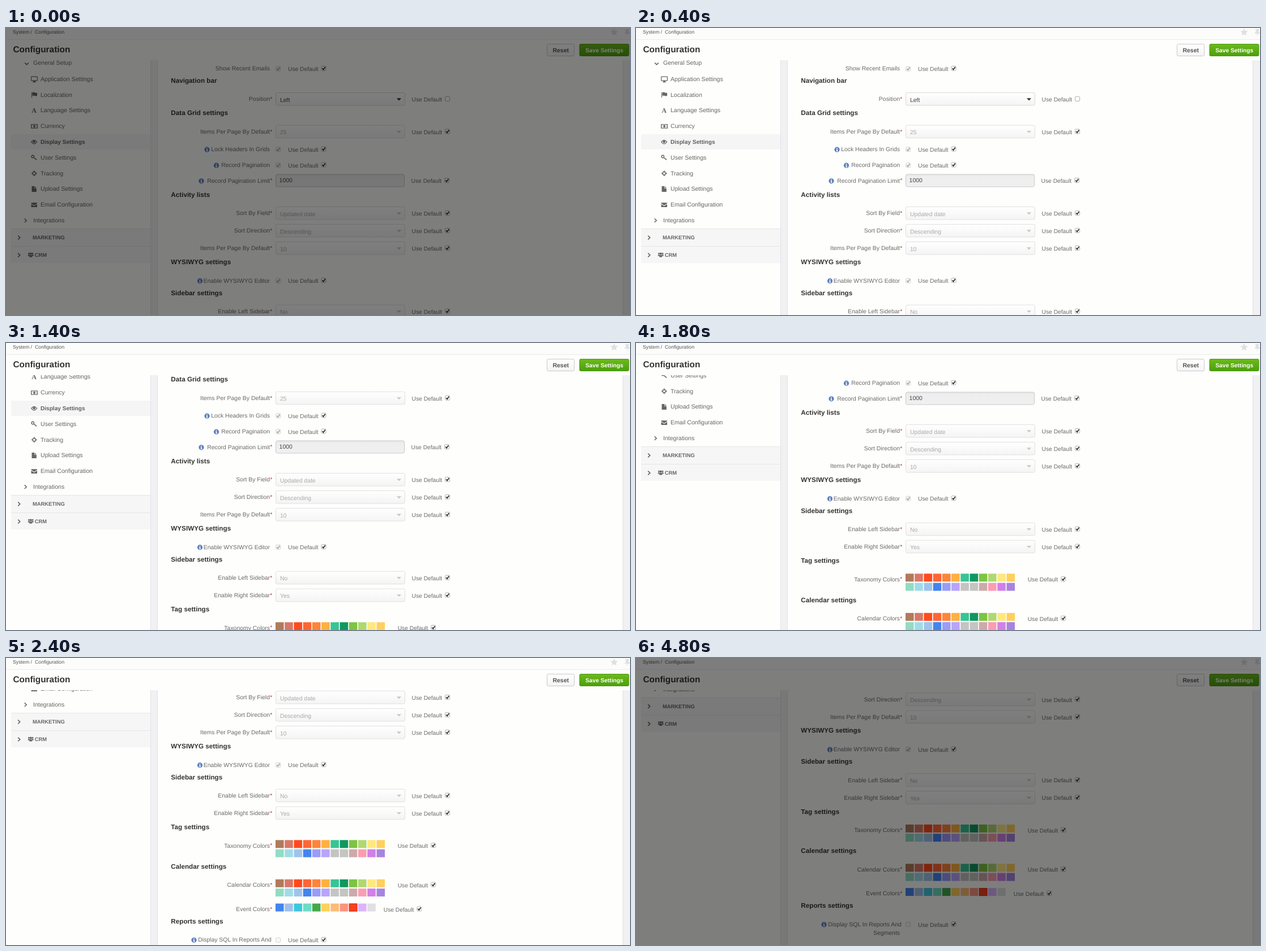
An HTML page that plays this animation: 1102x508 px, repeating every 5000 ms.

```html
<!DOCTYPE html>
<html lang="en">
<head>
<meta charset="utf-8">
<title>Configuration</title>
<style>
  html, body { margin: 0; width: 100%; height: 100%; overflow: hidden; background: #fefefc; }
  svg { display: block; width: 1102px; height: 508px; font-family: "Liberation Sans", Arial, sans-serif; }
  text { white-space: pre; text-rendering: geometricPrecision; }
  .crumb { font-size: 8.75px; fill: #555; }
  .title { font-size: 15.4px; font-weight: bold; fill: #333; }
  .btn { font-size: 10.5px; font-weight: bold; fill: #555; }
  .save { font-size: 10.2px; font-weight: bold; fill: #fff; }
  .nav { font-size: 10.57px; fill: #666; }
  .on { font-size: 10.1px; font-weight: bold; fill: #606060; }
  .group { font-size: 9.4px; font-weight: bold; fill: #666; }
  .head { font-size: 11.7px; font-weight: bold; fill: #333; }
  .label { font-size: 10.45px; fill: #6b6b6b; }
  .use { font-size: 10.25px; fill: #6b6b6b; }
  .star { font-size: 10.5px; fill: #b5464a; }
  .value { font-size: 10.45px; fill: #aaa; }
  .live { font-size: 10.45px; fill: #444; }
</style>
</head>
<body>
<svg id="stage" viewBox="0 0 1102 508">
  <defs>
    <linearGradient id="field" x2="0" y2="1"><stop stop-color="#fff"/><stop offset="1" stop-color="#f4f4f4"/></linearGradient>
    <linearGradient id="input" x2="0" y2="1"><stop stop-color="#e6e6e8"/><stop offset=".2" stop-color="#eeeeef"/><stop offset="1" stop-color="#f0f0f1"/></linearGradient>
    <linearGradient id="green" x2="0" y2="1"><stop stop-color="#6cba1c"/><stop offset="1" stop-color="#4ca00a"/></linearGradient>
    <clipPath id="view"><rect y="57" width="1102" height="451"/></clipPath>
  </defs>
  <rect width="1102" height="508" fill="#fefefc"/>
  <g id="frame"></g>
  <g clip-path="url(#view)"><g id="page"></g></g>
  <g id="top"></g>
  <rect id="dim" width="1102" height="508" fill="#000" opacity="0"/>
</svg>
<script>
const NS = "http://www.w3.org/2000/svg";
const byId = id => document.getElementById(id);
let layer;

function add(tag, attrs, content) {
  const el = document.createElementNS(NS, tag);
  for (const k in attrs) el.setAttribute(k, attrs[k]);
  if (content) el.textContent = content;
  layer.append(el);
  return el;
}
const rect = (x, y, width, height, fill, more) => add("rect", { x, y, width, height, fill, ...more });
const circle = (cx, cy, r, fill, more) => add("circle", { cx, cy, r, fill, ...more });
const path = (d, fill, more) => add("path", { d, fill, ...more });
const line = (d, stroke, width = 1) => path(d, "none", { stroke, "stroke-width": width });
// y is the middle of the capitals
const text = (s, x, y, cls, anchor = "start") =>
  add("text", { x, y: y + 3.4, class: cls, "text-anchor": anchor }, s);

// Fixed parts
layer = byId("frame");
rect(255, 57, 13, 451, "#f1f1f3");
rect(1089, 57, 13, 451, "#f1f1f3");
line("M255.5 57V508M267.5 57V508M1089.5 57V508", "#e2e2e5");

layer = byId("top");
rect(0, 0, 1102, 20, "#fcfcfb");
line("M0 20.5H1102", "#ececec");
text("System /", 12, 6.7, "crumb");
text("Configuration", 51, 6.7, "crumb");
text("Configuration", 12.5, 39.8, "title");
path("M1074 .8l2 4.3 4.7.5-3.5 3.1 1 4.6-4.2-2.4-4.2 2.4 1-4.6-3.5-3.1 4.7-.5z", "#e0e0e3");
path("M1093.5 2h7v1.5h-1v3.2l2.3 2.3v1h-4v4h-1.2v-4h-4v-1l2-2.3v-3.2h-1.1z", "#e0e0e3");
rect(955.5, 28.5, 48, 21, "url(#field)", { rx: 2, stroke: "#cacaca" });
text("Reset", 979.7, 39.4, "btn", "middle");
rect(1013, 28.5, 87, 21, "url(#green)", { rx: 2, stroke: "#4c9614" });
text("Save Settings", 1056.7, 39.4, "save", "middle");

// Scrolling parts
layer = byId("page");

function check(x, y, checked = true, off = false) {
  rect(x - 4, y - 4, 8, 8, off ? "#f8f8f8" : "#fff", { rx: 1.5, stroke: off ? "#d2d2d2" : "#b0b0b0" });
  if (checked) line(`M${x - 2.4} ${y}l1.9 2.2 3.3-4.7`, off ? "#aaa" : "#333", 1.8);
}

function info(x, y) {
  circle(x, y, 4.6, "#5c80bd");
  path(`M${x - .9} ${y - 3}h1.8v1.5h-1.8zM${x - 1.4} ${y - .7}h2.3v3h.7v1h-3v-1h.7v-2h-.7z`, "#fff");
}

function label(s, y, required, icon) {
  text(s, 466, y, "label", "end");
  if (required) text("*", 466.2, y - .3, "star");
  if (icon) info(icon, y + .5);
}

function useDefault(x, y, checked = true) {
  text("Use Default", x, y + .7, "use");
  check(x + 63, y - .6, checked);
}

const heading = (s, y) => text(s, 291.3, y + .6, "head");

function select(s, y, value, live) {
  label(s, y, true);
  rect(476.5, y - 11.5, 228, 22.5, "url(#field)", { rx: 2.5, stroke: live ? "#d8d8d8" : "#e0e0e0" });
  text(value, 484, y + 1.1, live ? "live" : "value");
  path(`M690 ${y - 1.8}h8l-4 4.2z`, live ? "#333" : "#c8c8c8");
  useDefault(716.6, y, !live);
}

function toggle(s, y, icon, checked = true) {
  label(s, y, false, icon);
  check(480.7, y + .1, checked, true);
  useDefault(498, y);
}

function swatches(colors, y) {
  colors.split(" ").forEach((c, i) =>
    rect(476 + (i % 12) * 16.22, y + Math.floor(i / 12) * 16.3, 14.6, 14, "#" + c));
}

toggle("Show Recent Emails", 72);
heading("Navigation bar", 93);
select("Position", 126, "Left", true);
heading("Data Grid settings", 150);
select("Items Per Page By Default", 183.7, "25");
toggle("Lock Headers In Grids", 214.7, 355);
toggle("Record Pagination", 242.7, 371.5);
label("Record Pagination Limit", 270.3, true, 345);
rect(476.5, 259, 227, 22, "url(#input)", { rx: 3, stroke: "#c8c8cb" });
text("1000", 482.6, 270, "live");
useDefault(715.6, 270.3);
heading("Activity lists", 294.5);
select("Sort By Field", 328, "Updated date");
select("Sort Direction", 359, "Descending");
select("Items Per Page By Default", 390, "10");
heading("WYSIWYG settings", 413.7);
toggle("Enable WYSIWYG Editor", 447.2, 342.5);
heading("Sidebar settings", 468.7);
select("Enable Left Sidebar", 501.7, "No");
select("Enable Right Sidebar", 532.7, "Yes");
heading("Tag settings", 557);

const palette = "b07a5c d87868 ff4a1c ff6636 ff8438 ffb040 38c494 109860 7cc444 b0d870 ffe880 ffd05c " +
  "92dcc4 9fdce8 9fc4ec 4484ee 9a9cf8 b9a4fb c4c4c4 c4c4c0 ccaaaa fc9cb2 d080e8 a884e0";
label("Taxonomy Colors", 590.2, true);
swatches(palette, 580.3);
useDefault(691.7, 590.2);
heading("Calendar settings", 626.7);
label("Calendar Colors", 659.7, true);
swatches(palette, 649.8);
useDefault(691.7, 659.7);
label("Event Colors", 702.5, true);
swatches("4484ee 9fc0ec 3cc8dc 70dcc4 44a848 ffd05c fcbc78 fc9480 f8401c dcb4fc e0e0e4", 692.6);
rect(606.3, 693.1, 13.6, 13, "none", { stroke: "#d03010" });
useDefault(666.8, 702.5);
heading("Reports settings", 723.7);
text("Display SQL In Reports And", 468.8, 757, "label", "end");
text("Segments", 466, 772.5, "label", "end");
info(332, 757.3);
check(480.7, 757.1, false, true);
useDefault(498, 757);

// Side menu
const INK = "#666";
const chevron = (x, y, w) => line(`M${x - 1.8} ${y - 3.3}l3.5 3.3-3.5 3.3`, INK, w);
const icons = {
  screen(y) {
    rect(44.6, y - 4.5, 10.8, 7, "none", { stroke: INK, "stroke-width": 1.2, rx: .6 });
    path(`M48.5 ${y + 2.5}h3l.5 2h1v1h-6v-1h1z`, INK);
  },
  flag(y) {
    line(`M45.5 ${y - 4.5}V${y + 5}`, INK, 1.1);
    path(`M46.5 ${y - 4}q2.5-1.5 4.500 0t4 0v5.500q-2 1.500-4 .2t-4.500.3z`, INK);
  },
  letter(y) {
    add("text", { x: 49.7, y: y + 3.8, fill: INK, "text-anchor": "middle", "font-size": 12, "font-weight": "bold",
      "font-family": '"Liberation Serif", serif' }, "A");
  },
  money(y) {
    rect(44.6, y - 3.2, 10.8, 6.4, "none", { stroke: INK, "stroke-width": 1.2 });
    add("ellipse", { cx: 50, cy: y, rx: 1.8, ry: 2.2, fill: INK });
    line(`M46 ${y - 1.5}v3M54 ${y - 1.5}v3`, "#999", .8);
  },
  eye(y) {
    path(`M44.6 ${y}q5-6.8 10 0q-5 6.8-10 0z`, "none", { stroke: INK, "stroke-width": 1.2 });
    circle(49.6, y - .4, 2.2, INK);
  },
  key(y) {
    circle(47.3, y - 1.8, 2.2, "none", { stroke: INK, "stroke-width": 1.4 });
    line(`M48.9 ${y - .4}l5 4.6M51 ${y + 2.8}l1.3-1.4M52.8 ${y + 4.2}l1.2-1.3`, INK, 1.3);
  },
  target(y) {
    circle(49.8, y, 3, "none", { stroke: INK, "stroke-width": 1.2 });
    line(`M49.8 ${y - 5}v3.6M49.8 ${y + 1.4}v3.6M44.8 ${y}h3.6M51.2 ${y}h3.6`, INK, 1.3);
  },
  file(y) {
    path(`M45.5 ${y - 5}h4.5v3.7h3.8v6.3h-8.3zM50.8 ${y - 5}l3 2.9h-3z`, INK);
  },
  mail(y) {
    path(`M44.5 ${y - 3.8}h10.5v1.3l-5.2 3.5-5.3-3.5zM44.5 ${y - 1.2}l5.3 3.4 5.2-3.4v5.2h-10.5z`, INK);
  }
};

line("M33.2 61.6l3.3 3.3 3.3-3.3", INK, 1.5);
text("General Setup", 48, 61.8, "nav");
rect(9, 188, 246, 27, "#f5f5f5");
[
  ["Application Settings", 90.7, "screen"],
  ["Localization", 118.3, "flag"],
  ["Language Settings", 146, "letter"],
  ["Currency", 174, "money"],
  ["Display Settings", 201.7, "eye"],
  ["User Settings", 229.3, "key"],
  ["Tracking", 257.3, "target"],
  ["Upload Settings", 285, "file"],
  ["Email Configuration", 313, "mail"]
].forEach(([s, y, icon]) => {
  icons[icon](y);
  text(s, 61, y, icon === "eye" ? "on" : "nav");
});
chevron(34.5, 340.7, 1.5);
text("Integrations", 48, 340.7, "nav");
rect(9, 355.5, 246, 60.5, "#f6f6f6");
line("M9 355.5H255M9 386.5H255", "#e6e6e6");
chevron(23, 371, 1.7);
text("MARKETING", 47, 370.8, "group");
chevron(23, 402, 1.7);
for (const [x, y, r] of [[40.4, 399.2, 1.4], [47, 399.2, 1.4], [43.7, 399.6, 2]]) {
  circle(x, y, r, INK);
  path(`M${x - r * 1.3} ${y + r * 3}q0-${r * 1.9} ${r * 1.3}-${r * 1.9}t${r * 1.3} ${r * 1.9}z`, INK);
}
text("CRM", 50.7, 401.8, "group");

// [start in ms, scroll, dim]
const steps = [
  [0, 0, .5],
  [200, 0, 0],
  [1000, 86, 0],
  [1800, 172, 0],
  [2000, 258, 0],
  [2600, 285.5, 0],
  [4800, 285.5, .5]
];
const LOOP = 5000;
const page = byId("page"), dim = byId("dim");

function draw(now) {
  const t = now % LOOP;
  const [, scroll, shade] = steps.findLast(s => s[0] <= t);
  page.setAttribute("transform", `translate(0 ${-scroll})`);
  dim.setAttribute("opacity", shade);
}
function tick() {
  draw(performance.now());
  requestAnimationFrame(tick);
}
tick();
</script>
</body>
</html>
```
